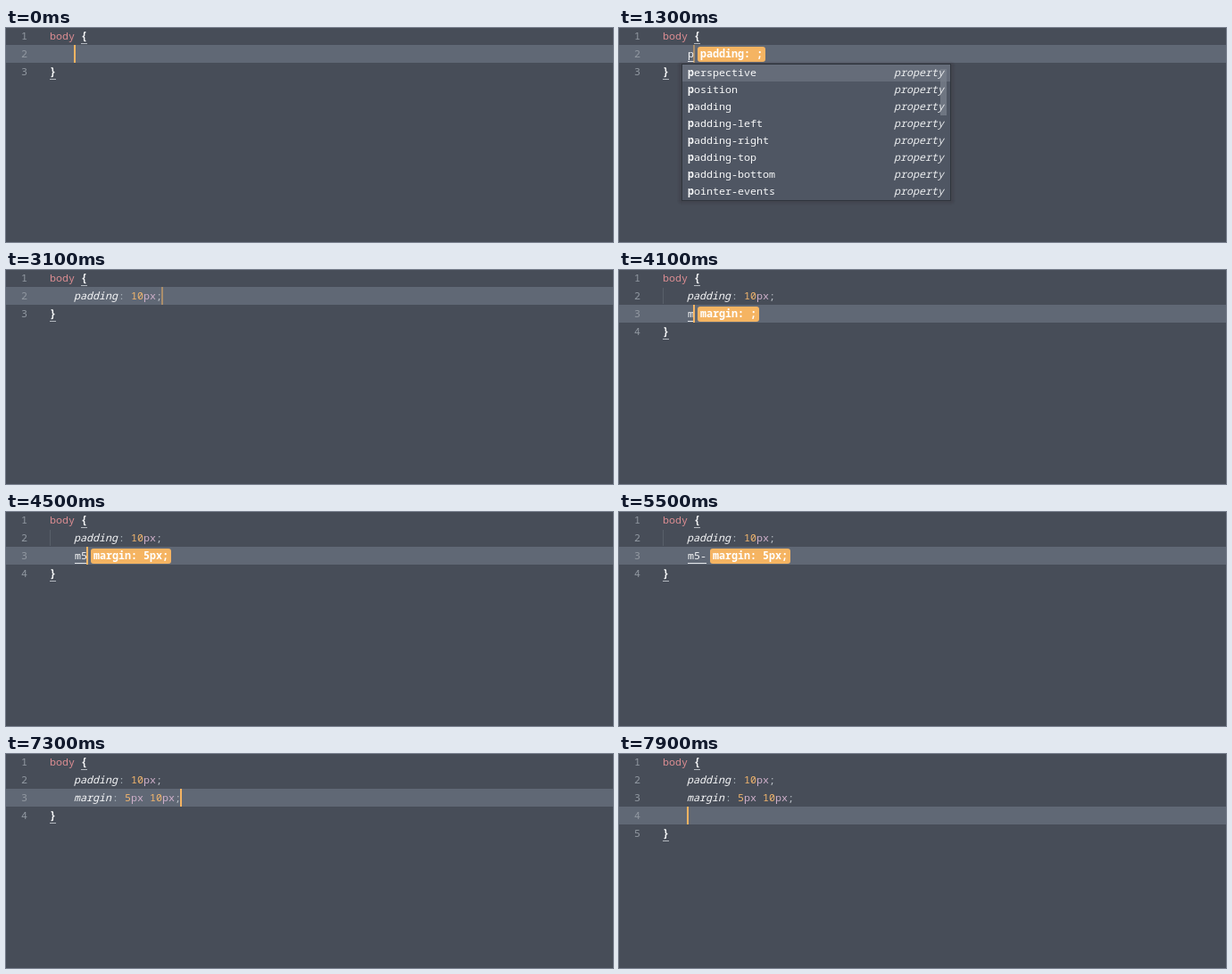
Recreate the animation shown at these times as an HTML page. Size 680 px wide and 240 px high, loop 8000 ms.

```html
<!DOCTYPE html>
<html lang="en">
<head>
<meta charset="utf-8">
<title>CSS abbreviations</title>
<style>
  html, body { margin: 0; width: 100%; height: 100%; overflow: hidden; background: #474d58; }
  svg { display: block; }
  text { font: 11.667px "Noto Sans Mono", "DejaVu Sans Mono", monospace; white-space: pre; }
  .bold { font-weight: 700; }
  .semi { font-weight: 600; }
  .prop { font-style: italic; font-weight: 500; }
</style>
</head>
<body>
<svg id="stage" width="680" height="240" viewBox="0 0 680 240"></svg>
<script>
const LOOP = 8000, CHAR = 7, LEFT = 49, INDENT = 77;
const WHITE = '#f8f9fa', ORANGE = '#f5b462', GRAY = '#9299a2';
const PADDING = ['padding', '10px'], MARGIN = ['margin', '5px 10px'];

// What the editor holds after each keystroke
const states = [
  { at: -300, done: [] },
  { at: 800, done: [], abbr: 'p', hint: 'padding: ;' },
  { at: 1500, done: [], abbr: 'p1', hint: 'padding: 1px;' },
  { at: 2000, done: [], abbr: 'p10', hint: 'padding: 10px;' },
  { at: 2600, done: [PADDING], stay: true },
  { at: 3300, done: [PADDING] },
  { at: 4000, done: [PADDING], abbr: 'm', hint: 'margin: ;' },
  { at: 4400, done: [PADDING], abbr: 'm5', hint: 'margin: 5px;' },
  { at: 4900, done: [PADDING], abbr: 'm5-', hint: 'margin: 5px;' },
  { at: 5800, done: [PADDING], abbr: 'm5-1', hint: 'margin: 5px 1px;' },
  { at: 6100, done: [PADDING], abbr: 'm5-10', hint: 'margin: 5px 10px;' },
  { at: 7000, done: [PADDING, MARGIN], stay: true },
  { at: 7500, done: [PADDING, MARGIN] }
];
const POPUP = { from: 900, to: 1500 };
const options = ['perspective', 'position', 'padding', 'padding-left', 'padding-right',
  'padding-top', 'padding-bottom', 'pointer-events'];

const stage = document.getElementById('stage');
const baseline = row => row * 20 - 7;
const rect = (x, y, w, h, fill, more = '') =>
  `<rect x="${x}" y="${y}" width="${w}" height="${h}" fill="${fill}" ${more}/>`;
const text = (x, y, fill, str, cls = '') =>
  `<text x="${x}" y="${y}" fill="${fill}" class="${cls}">${str}</text>`;

function brace(x, row, char) {
  const y = baseline(row);
  return text(x, y, WHITE, char, 'bold') + rect(x, y + 4, CHAR, 1, '#b3b8bf');
}

function declaration([name, value], row) {
  const y = baseline(row), colon = INDENT + name.length * CHAR;
  const parts = value.replace(/\d+|px/g, part =>
    `<tspan fill="${part === 'px' ? '#cfb0cb' : '#f3b66d'}">${part}</tspan>`);
  return text(INDENT - 1, y, WHITE, name, 'prop') +
    text(colon, y, '#a9b4bc', ':') +
    text(colon + 2 * CHAR, y, '#b9bfc6', parts + ';');
}

function hintBox(x, row, str) {
  return rect(x + 4, row * 20 - 19, str.length * CHAR + 6, 17, ORANGE, 'rx="3"') +
    text(x + 7, baseline(row), '#fff', str, 'semi');
}

function popup() {
  let out = '';
  for (let i = 6; i > 0; i--) {
    out += rect(71 - i, 43 - i, 300 + 2 * i, 150 + 2 * i, '#20252c', `rx="${i}" opacity=".035"`);
  }
  out += rect(70.5, 40.5, 301, 153, '#4f5663', 'stroke="#2f343c"');
  out += rect(71, 41, 300, 19, '#656c79');
  out += rect(360, 46, 7, 52, '#7a818c', 'opacity=".75"');
  options.forEach((name, i) => {
    const y = 54 + i * 19;
    out += text(INDENT, y, WHITE, `<tspan class="bold">${name[0]}</tspan>${name.slice(1)}`);
    out += text(308, y, '#eceef0', 'property', 'prop');
  });
  return out;
}

// Solid after a key press, then a soft blink once a second
function caretAlpha(age) {
  if (age < 400) return 1;
  const phase = (age - 400) % 1000;
  if (phase < 200) return 1 - phase / 200;
  return Math.min(1, Math.max(0, (phase - 500) / 200));
}

function render(t) {
  const state = states.filter(s => s.at <= t).pop();
  const { done, abbr = '', hint, stay } = state;
  const row = done.length + (stay ? 1 : 2);
  const last = done.length + (stay ? 2 : 3);
  let out = rect(0, 0, 680, 240, '#474d58') + rect(0, row * 20 - 21, 680, 20, '#606875');

  for (let i = 1; i <= last; i++) out += text(17, baseline(i), GRAY, i);
  out += text(LEFT, baseline(1), '#dc8d92', 'body') + brace(84, 1, '{') + brace(LEFT, last, '}');
  if (done.length === 1 && !stay) out += rect(49, 20, 1, 18, '#59606a');
  done.forEach((d, i) => { out += declaration(d, i + 2); });

  let x = INDENT + abbr.length * CHAR;
  if (stay) x = INDENT + (done[done.length - 1].join(': ').length + 1) * CHAR;
  if (abbr) {
    out += text(INDENT, baseline(row), WHITE, abbr);
    out += rect(INDENT, baseline(row) + 4, abbr.length * CHAR, 1, '#e4e6e9');
    out += hintBox(x, row, hint);
  }
  out += rect(x - 1, row * 20 - 21, 2, 20, ORANGE, `opacity="${caretAlpha(t - state.at)}"`);
  if (t >= POPUP.from && t < POPUP.to) out += popup();
  stage.innerHTML = out;
}

const start = performance.now();
function tick() {
  render((performance.now() - start) % LOOP);
  requestAnimationFrame(tick);
}
tick();
</script>
</body>
</html>
```
